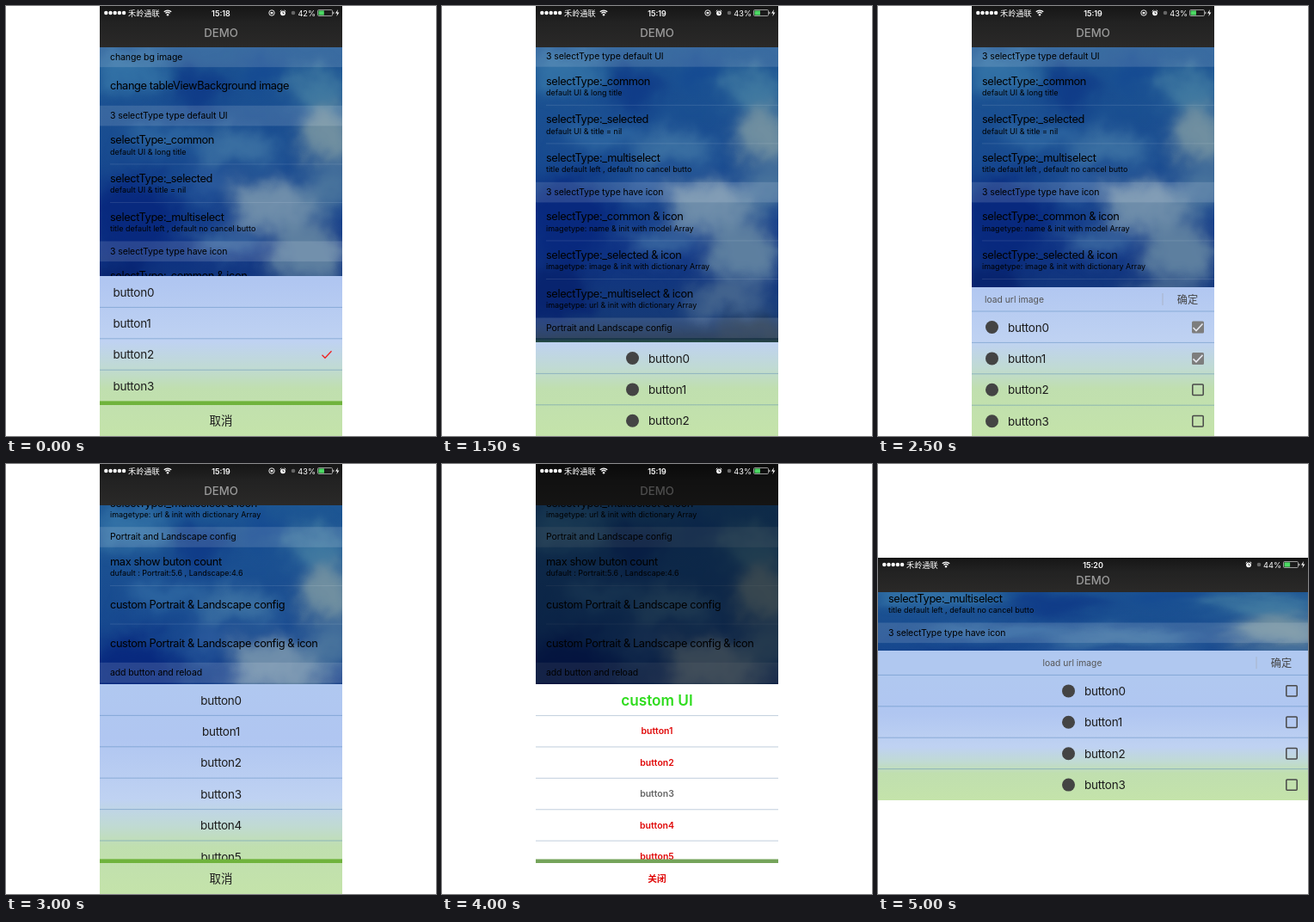
Animation, 500 px wide and 500 px high, one loop 5.5 s. Source, as an HTML page:

```html
<!DOCTYPE html>
<html lang="en">
<meta charset="utf-8">
<title>Action sheet demo</title>
<style>
  html, body { margin: 0; width: 100%; height: 100%; overflow: hidden; background: #fff; }
  svg { display: block; width: 500px; height: 500px; }
  text { font-family: Inter, "Noto Sans CJK SC", "Noto Sans CJK", sans-serif; dominant-baseline: central; white-space: pre; }
</style>
<svg id="stage" viewBox="0 0 500 500">
  <defs>
    <clipPath id="tall"><rect x="109" width="282" height="500"/></clipPath>
    <clipPath id="wide"><rect y="109" width="500" height="282"/></clipPath>
    <clipPath id="rows"><rect x="109" width="282" height="460"/></clipPath>
    <filter id="cloud" filterUnits="userSpaceOnUse" x="60" y="0" width="380" height="440" color-interpolation-filters="sRGB">
      <feGaussianBlur stdDeviation="11" result="soft"/>
      <feTurbulence type="fractalNoise" baseFrequency=".025" numOctaves="3" seed="4"/>
      <feDisplacementMap in="soft" scale="34" xChannelSelector="R" yChannelSelector="G"/>
    </filter>
    <linearGradient id="sky" x2="0" y2="500" gradientUnits="userSpaceOnUse">
      <stop offset=".1" stop-color="#1d5693"/><stop offset=".4" stop-color="#17488f"/>
      <stop offset=".56" stop-color="#0e3284"/><stop offset=".72" stop-color="#153a78"/>
      <stop offset=".77" stop-color="#122a4c"/><stop offset=".8" stop-color="#4d8a38"/>
      <stop offset=".9" stop-color="#70b33c"/>
    </linearGradient>
    <linearGradient id="glass0" x2="0" y2="500" gradientUnits="userSpaceOnUse">
      <stop offset=".5" stop-color="#b0c8f0"/><stop offset=".64" stop-color="#b0c6f1"/>
      <stop offset=".78" stop-color="#bfd2f2"/><stop offset=".84" stop-color="#c0dad4"/>
      <stop offset=".89" stop-color="#c0dfaf"/><stop offset="1" stop-color="#c4e3aa"/>
    </linearGradient>
    <linearGradient id="glass1" href="#glass0" gradientTransform="translate(0 109) scale(1 .564)"/>
    <linearGradient id="bar" x2="0" y2="1">
      <stop stop-color="#161616"/><stop offset=".4" stop-color="#222"/><stop offset="1" stop-color="#2a2928"/>
    </linearGradient>
  </defs>
</svg>
<script>
const stage = document.getElementById('stage');
const ROW = 36.4, STEP = 500;

const rect = (x, y, w, h, fill, more = '') =>
  `<rect x="${x}" y="${y}" width="${w}" height="${h}" fill="${fill}" ${more}/>`;
const path = (d, color, width = 1) => `<path d="${d}" fill="none" stroke="${color}" stroke-width="${width}"/>`;
const disc = (x, y, r, fill) => `<circle cx="${x}" cy="${y}" r="${r}" fill="${fill}"/>`;
const text = (s, x, y, size, { fill = '#000', anchor = 'start', weight = 400, track = 0 } = {}) =>
  `<text x="${x}" y="${y}" font-size="${size}" fill="${fill}" text-anchor="${anchor}"
    font-weight="${weight}" letter-spacing="${track}em">${s.replace(/&/g, '&amp;')}</text>`;
const mid = (s, x, y, size, fill, weight = 400) => text(s, x, y, size, { fill, weight, anchor: 'middle' });
const numbered = (from, to) => Array.from({ length: to - from + 1 }, (_, i) => 'button' + (from + i));

// Soft patches of sky: x, y, rx, ry, colour
const clouds = [
  [140, 75, 42, 22, '#3372a6'], [225, 98, 34, 26, '#103c88'], [300, 80, 28, 18, '#154a92'],
  [362, 95, 42, 22, '#3f78a0'], [185, 150, 45, 14, '#2f68a2'], [270, 165, 50, 16, '#3f74a4'],
  [374, 150, 32, 36, '#708fa0'], [150, 248, 54, 50, '#08297e'], [235, 205, 26, 20, '#2b5a9c'],
  [312, 230, 56, 28, '#6f8eaa'], [375, 215, 24, 26, '#48739c'], [255, 275, 44, 16, '#3a68a0'],
  [352, 285, 46, 36, '#5d7f9f'], [130, 335, 42, 38, '#08246f'], [330, 342, 56, 16, '#4a6a90'],
  [365, 380, 40, 12, '#26384a']
];
const sky = () => rect(109, 0, 282, 500, 'url(#sky)') + '<g filter="url(#cloud)">' + clouds.map(([x, y, rx, ry, c]) =>
  `<ellipse cx="${x}" cy="${y}" rx="${rx}" ry="${ry}" fill="${c}"/>`).join('') + '</g>';

const sections = [
  ['change bg image', ['change tableViewBackground image']],
  ['3 selectType type default UI', [
    ['selectType:_common', 'default UI & long title'],
    ['selectType:_selected', 'default UI & title = nil'],
    ['selectType:_multiselect', 'title default left , default no cancel butto']]],
  ['3 selectType type have icon', [
    ['selectType:_common & icon', 'imagetype: name & init with model Array'],
    ['selectType:_selected & icon', 'imagetype: image & init with dictionary Array'],
    ['selectType:_multiselect & icon', 'imagetype: url & init with dictionary Array']]],
  ['Portrait and Landscape config', [
    ['max show buton count', 'dufault : Portrait:5.6 , Landscape:4.6'],
    'custom Portrait & Landscape config',
    'custom Portrait & Landscape config & icon']],
  ['add button and reload', []]
];

function list(left, width, scroll) {
  let y = 47.5 - scroll, out = '';
  for (const [head, items] of sections) {
    out += rect(left, y, width, 23.6, '#fff', 'opacity=".13"') + text(head, left + 12, y + 11.7, 10.5, { track: -.01 });
    y += 23.6;
    items.forEach((item, i) => {
      const [title, sub] = [].concat(item);
      out += text(title, left + 12, y + (sub ? 16.5 : 21.8), 12.8, { track: -.03 });
      if (sub) out += text(sub, left + 12, y + 29.7, 9);
      y += 44.7;
      if (i < items.length - 1) out += rect(left + 12, y - .5, width - 12, .7, '#fff', 'opacity=".15"');
    });
  }
  return out;
}

function status(left, right, top, { time, charge, lock }) {
  const y = top + 8, white = '#fff';
  let out = '';
  for (let i = 0; i < 5; i++) out += disc(left + 7.3 + i * 5.2, y, 2.2, white);
  out += text('禾岭通联', left + 33, y, 9.2, { fill: white });
  const wx = left + 79, arc = r => `M${wx - r} ${y + 3 - r}A${r * 1.42} ${r * 1.42} 0 0 1 ${wx + r} ${y + 3 - r}`;
  out += path(arc(4.2) + arc(2.5), white, 1.3) + disc(wx, y + 2.3, 1.2, white);
  out += mid(time, 250, y, 9, white, 600);
  if (lock) out += `<circle cx="${right - 82}" cy="${y}" r="3.2" fill="none" stroke="#fff" stroke-width=".9"/>` +
    rect(right - 83.4, y - 1, 2.8, 2.2, white);
  const ax = right - 69;
  out += disc(ax, y + .3, 2.9, white) + path(`M${ax} ${y - 1.5}v2h1.5`, '#222', .8) +
    path(`M${ax - 3.3} ${y - 1.8}l1.6-1.6M${ax + 3.3} ${y - 1.8}l-1.6-1.6`, white, 1);
  out += disc(right - 57, y, 2.3, '#666');
  out += text(charge + '%', right - 31, y, 9.2, { fill: white, anchor: 'end' });
  out += rect(right - 28.5, y - 3.5, 17, 7, 'none', 'rx="1.2" stroke="#bbb" stroke-width=".8"') +
    rect(right - 27.5, y - 2.6, 15 * charge / 100, 5.2, '#4cd964') + rect(right - 10.8, y - 1.2, 1.2, 2.4, '#bbb');
  return out + `<path d="M${right - 5} ${y - 4}l-3 4.6h2.2l-.8 3.4l3-4.6h-2.2z" fill="#fff"/>`;
}

const tick = (x, y, color, w = 1.3) => path(`M${x - 5.5} ${y + .5}l3.5 3.5l7.5-8`, color, w);
const checkbox = (x, y, on) => on
  ? rect(x - 7, y - 7, 14, 14, '#7d7d7d', 'rx="1.5"') + tick(x, y, '#e4e6ee', 1.6)
  : rect(x - 6.2, y - 6.2, 12.4, 12.4, 'none', 'rx="1" stroke="#484848" stroke-width="1.5"');

// Frosted panel: title strip, button rows, marks on the right, optional cancel row
function sheet({ left, width, bottom, wide, top, head = 0, title = '', ok, rows, centre, icons, boxes, checked = -1, cancel, extra = '' }) {
  const glass = `url(#glass${wide ? 1 : 0})`, right = left + width, line = 'rgba(70,125,180,.42)';
  const end = cancel ? bottom - 40.4 : bottom;
  let out = rect(left, top, width, end - top, glass), body = '';
  if (ok) {
    const y = top + head / 2;
    body += wide ? mid(title, 226, y, 10.3, '#555') : text(title, left + (icons ? 15 : 18), y, 10.3, { fill: '#555' });
    body += rect(right - 60.5, y - 7, 1, 14, '#a9b4c8') + mid(ok, right - 31, y, 12.2, '#444');
  }
  rows.forEach((label, i) => {
    const y0 = top + head + i * ROW, y = y0 + ROW / 2 + .3;
    if (i || head) body += rect(left, y0 - .5, width, 1, line);
    const x = centre ? (icons ? 240 : 250) : left + (icons ? 42 : 15.5);
    body += text(label, x, y, 13.5, { fill: '#1c1c1c', track: -.02, anchor: centre && !icons ? 'middle' : 'start' });
    if (icons) body += disc(x - 18.5, y, 7.5, '#444');
    if (boxes) body += checkbox(right - 19, y, boxes.includes(i));
    if (i === checked) body += tick(right - 18, y, '#f02020');
  });
  out += cancel && !wide ? `<g clip-path="url(#rows)">${body}</g>` : body;
  if (cancel) out += rect(left, end, width, 4.4, '#6fb33c') + rect(left, bottom - 36, width, 36, glass) +
    mid(cancel, 250, bottom - 18, 13.5, '#1c1c1c');
  return out + extra;
}

function customSheet() {
  let body = rect(109, 256, 282, 204, '#fff') + mid('custom UI', 250, 274, 17.2, '#2fdc1e', 600);
  numbered(1, 5).forEach((label, i) => {
    const y = 292.6 + i * ROW;
    body += rect(109, y - .6, 282, 1.1, '#c6d3e0') + mid(label, 250, y + ROW / 2, 10.5, i === 2 ? '#666' : '#e00808', 600);
  });
  return `<g clip-path="url(#rows)">${body}</g>` + rect(109, 459.5, 282, 4.5, '#75a45a') +
    rect(109, 464, 282, 36, '#fff') + mid('关闭', 250, 482, 10.7, '#e00808', 700);
}

const redTitle = rect(109, 239, 282, 75, '#f00') + mid('自定义titleView', 250, 246.5, 12.9, '#24ff00') +
  rect(175, 254.5, 150, 30, '#24ff00') + mid('title button', 250, 270, 10.8, '#2a68e8');
const longTitle = mid('this is a long title , long title , long title', 250, 277, 10.3, '#555') +
  mid('long title , long title , long title', 250, 293, 10.3, '#555');

function screen({ wide, scroll, dim, bar, panel }) {
  const [left, width, top, nav, bottom] = wide ? [0, 500, 109, 40, 391] : [109, 282, 0, 48, 500];
  const turn = wide ? 'translate(0 109) scale(1.773 .564) translate(-109 0)' : '';
  return `<g clip-path="url(#${wide ? 'wide' : 'tall'})"><g transform="${turn}">${sky()}</g>` +
    list(left, width, scroll) + rect(left, top, width, nav, 'url(#bar)') +
    mid('DEMO', 250, top + nav - (wide ? 14 : 16.6), 13.2, '#9b9b9b', 500) +
    (dim ? rect(left, top, width, bottom - top, '#000', 'opacity=".5"') : '') +
    status(left, left + width, top, bar) +
    (panel ? sheet({ left, width, bottom, wide, ...panel }) : customSheet()) + '</g>';
}

const clock = (minute, charge, lock) => ({ time: '15:' + minute, charge, lock });
const four = numbered(0, 3);
const scenes = [
  { scroll: 0, bar: clock(18, 42, true), panel: { top: 314, rows: four, checked: 2, cancel: '取消' } },
  { scroll: 0, bar: clock(18, 42, true), panel: { top: 256, head: 58, rows: four, centre: true, cancel: '取消', extra: longTitle } },
  { scroll: 0, bar: clock(18, 43, true), panel: { top: 363, head: 28, title: 'titiititititiit', ok: '确定', rows: numbered(0, 2), boxes: [0] } },
  { scroll: 68.7, bar: clock(19, 43, true), panel: { top: 391, rows: numbered(0, 2), centre: true, icons: true } },
  { scroll: 68.7, bar: clock(19, 43, true), panel: { top: 256, rows: numbered(0, 5), icons: true, checked: 1, cancel: '取消' } },
  { scroll: 68.7, bar: clock(19, 43, true), panel: { top: 327, head: 28, title: 'load url image', ok: '确定', rows: four, icons: true, boxes: [0, 1] } },
  { scroll: 358, bar: clock(19, 43, true), panel: { top: 256, rows: numbered(0, 5), centre: true, cancel: '取消' } },
  { scroll: 358, bar: clock(19, 43), panel: { top: 314, rows: numbered(1, 4), centre: true, cancel: '取消', extra: redTitle } },
  { scroll: 358, bar: clock(19, 43), dim: true },
  { wide: true, scroll: 89, bar: clock(20, 43), panel: { top: 205, rows: four, centre: true, cancel: '取消' } },
  { wide: true, scroll: 89, bar: clock(20, 44), panel: { top: 217, head: 28.4, title: 'load url image', ok: '确定', rows: four, centre: true, icons: true, boxes: [] } }
];

const layers = scenes.map(scene => {
  const g = document.createElementNS('http://www.w3.org/2000/svg', 'g');
  g.innerHTML = screen(scene);
  return stage.appendChild(g);
});

const start = performance.now();
function draw() {
  const current = Math.floor((performance.now() - start) / STEP) % layers.length;
  layers.forEach((g, i) => g.style.display = i === current ? '' : 'none');
  requestAnimationFrame(draw);
}
draw();
</script>
</html>
```
